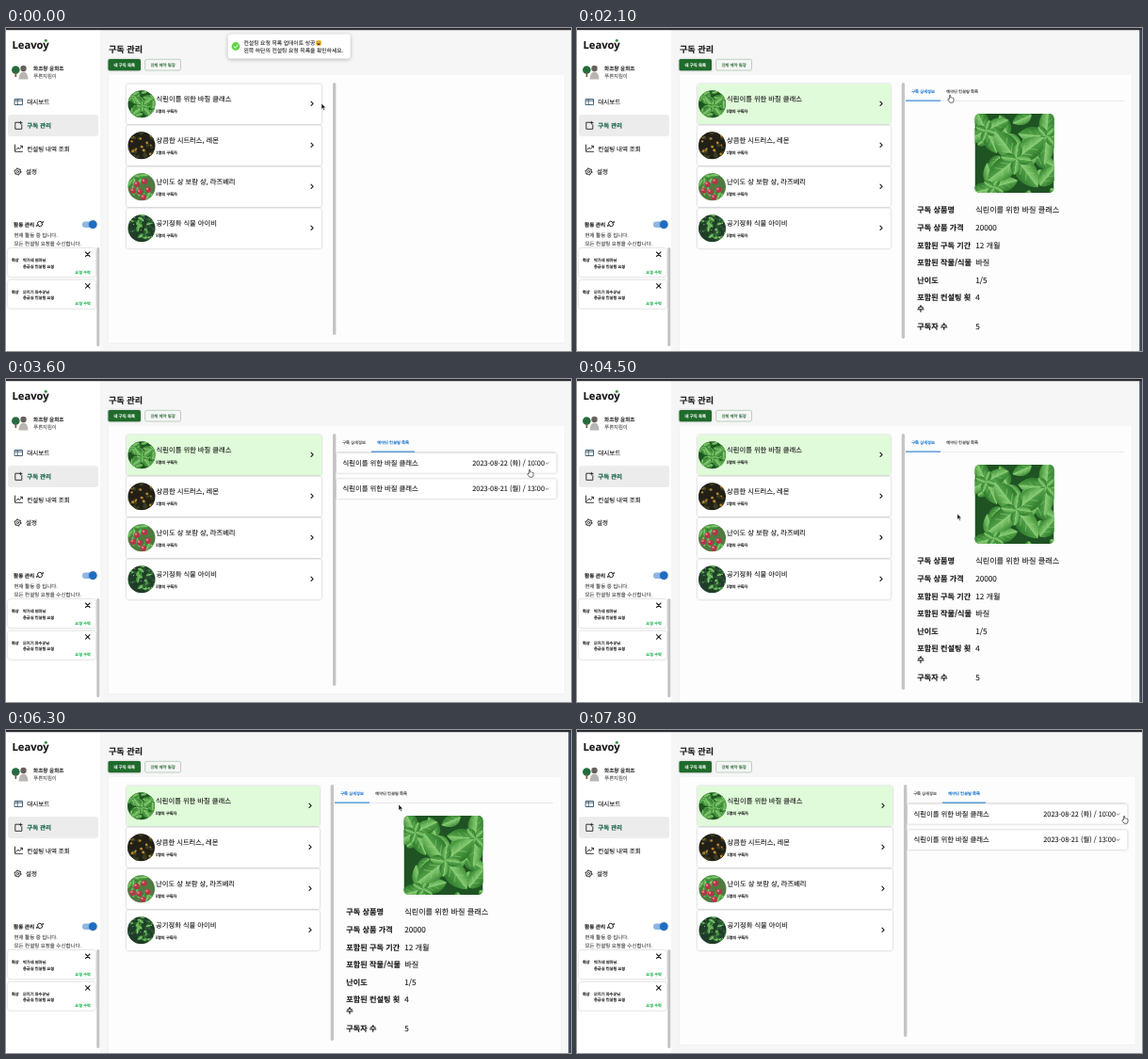
Recreate the animation shown at these times as an HTML page. Size 600x343 px, loop 8 s.

```html
<!DOCTYPE html>
<html lang="ko">
<head>
<meta charset="utf-8">
<title>구독 관리</title>
<style>
@property --narrow { syntax: "<number>"; inherits: true; initial-value: 0; }
@property --sel { syntax: "<number>"; inherits: true; initial-value: 0; }
@property --booked { syntax: "<number>"; inherits: true; initial-value: 0; }

html, body { margin: 0; width: 100%; height: 100%; overflow: hidden; background: #f6f6f6; }
svg { display: block; }
#app {
  width: 600px; height: 343px; color: #1a1a1a;
  font-family: "Noto Sans CJK KR", "Noto Sans CJK", "Noto Sans", sans-serif;
  animation: state 8s step-end infinite;
}
/* A hairline keeps the small type as dark as a scaled-down screen. */
text { fill: currentColor; stroke: currentColor; stroke-width: .1px; text-rendering: geometricPrecision; }
.b { font-weight: 700; }
.m { font-weight: 500; stroke-width: .16px; }
.mid { text-anchor: middle; }
.line { fill: none; stroke: #222; stroke-linecap: round; stroke-linejoin: round; }
.lift { filter: drop-shadow(0 .6px .8px #0004); }

/* Layout follows the page width; --narrow is 1 while the right edge is taken. */
#panel {
  width: calc(485px - 4px * var(--narrow)); height: calc(284.5px + 20px * var(--narrow));
  filter: drop-shadow(0 .3px .5px #0002);
}
.card { width: calc(207px - 2px * var(--narrow)); }
.nudge { transform: translateX(calc(-.5px * var(--narrow))); }
.shift { transform: translateX(calc(-2px * var(--narrow))); }
#divider { transform: translateX(calc(-2.3px * var(--narrow))); height: calc(268px + 4px * var(--narrow)); }
#toastBox { transform: translateX(calc(-2.3px * var(--narrow))); }
.picked { fill: #e0fbd9; opacity: var(--sel); }
#tabs { opacity: var(--sel); }
#detail, #edge { opacity: var(--narrow); }
#booked { opacity: var(--booked); }
#tab1 { color: color-mix(in srgb, #1976d2 calc(var(--narrow) * 100%), #555); }
#tab2 { color: color-mix(in srgb, #1976d2 calc(var(--booked) * 100%), #555); }

@keyframes state {
  0% { --narrow: 0; --sel: 0; --booked: 0; }
  6.25% { --narrow: 1; --sel: 1; --booked: 0; }
  28.75% { --narrow: 0; --sel: 1; --booked: 1; }
  52.5% { --narrow: 1; --sel: 1; --booked: 0; }
  83.75%, 100% { --narrow: 0; --sel: 1; --booked: 1; }
}

#bar { animation: bar 8s cubic-bezier(.4, 0, .2, 1) infinite; }
@keyframes bar {
  0%, 28.75% { x: 351px; width: 37px; }
  31.25%, 52.5% { x: 388px; width: 46px; }
  55%, 83.75% { x: 351px; width: 37px; }
  86.25%, 100% { x: 388px; width: 46px; }
}

#toast { transform-origin: 301px 19.5px; animation: toast 8s linear infinite; }
@keyframes toast {
  0% { transform: none; opacity: 1; }
  14.85% { transform: none; opacity: 1; animation-timing-function: cubic-bezier(.06, .71, .55, 1); }
  18.85% { transform: translateY(-39px) scale(.6); opacity: 0; }
  57.99% { transform: translateY(-52px) scale(.6); opacity: 0; }
  58% { transform: translateY(-52px) scale(.6); opacity: .5; animation-timing-function: cubic-bezier(.21, 1.02, .73, 1); }
  62% { transform: none; opacity: 1; }
  73% { transform: none; opacity: 1; animation-timing-function: cubic-bezier(.06, .71, .55, 1); }
  77%, 100% { transform: translateY(-39px) scale(.6); opacity: 0; }
}

#cursor { animation: move 8s linear infinite; }
@keyframes move {
  0%, 1.25% { transform: translate(335px, 80px); }
  5%, 15% { transform: translate(324px, 80px); }
  18% { transform: translate(340px, 78px); }
  25% { transform: translate(394px, 71px); }
  26.25%, 30% { transform: translate(396px, 71px); }
  40% { transform: translate(540px, 92px); }
  45%, 46.25% { transform: translate(556px, 96px); }
  51%, 53.5% { transform: translate(370px, 68px); }
  58% { transform: translate(425px, 190px); }
  60.5% { transform: translate(436px, 308px); }
  63.75% { transform: translate(445px, 210px); }
  67.5% { transform: translate(445px, 200px); }
  74% { transform: translate(425px, 110px); }
  78.75% { transform: translate(417px, 79px); }
  81.5%, 84.5% { transform: translate(405px, 69px); }
  91% { transform: translate(555px, 88px); }
  94% { transform: translate(576px, 130px); }
  97.5%, 100% { transform: translate(581px, 91px); }
}
#arrow { animation: arrow 8s step-end infinite; }
#hand { animation: hand 8s step-end infinite; }
#beam { animation: beam 8s step-end infinite; }
@keyframes arrow {
  0%, 16.25%, 55%, 67.5%, 93.75% { opacity: 1; }
  2.5%, 23.75%, 57.5%, 81.25%, 96.25%, 100% { opacity: 0; }
}
@keyframes hand {
  0%, 16.25%, 55%, 93.75% { opacity: 0; }
  2.5%, 23.75%, 81.25%, 96.25%, 100% { opacity: 1; }
}
@keyframes beam {
  0%, 67.5%, 100% { opacity: 0; }
  57.5% { opacity: 1; }
}
</style>
</head>
<body>
<svg id="app" viewBox="0 0 600 343">
  <defs>
    <clipPath id="round"><circle r="14.5"/></clipPath>
    <clipPath id="photoBox"><rect x="-42" y="-42" width="84" height="84" rx="5"/></clipPath>
    <linearGradient id="leafTone" x1="0" y1="0" x2="1" y2="0">
      <stop offset="0" stop-color="#3f8f37"/><stop offset=".48" stop-color="#86cc72"/>
      <stop offset=".52" stop-color="#4f9f45"/><stop offset="1" stop-color="#2f7a2d"/>
    </linearGradient>
    <g id="leaf">
      <path d="M0 0C-14-7-16-24 0-38C16-24 14-7 0 0Z" fill="url(#leafTone)"/>
      <path d="M0-2V-34M0-9L-7-16M0-9L7-16M0-18L-6-24M0-18L6-24" fill="none" stroke="#9bd286" stroke-width=".5"/>
    </g>
    <g id="basil"></g>
    <g id="lemon"></g>
    <g id="berry"></g>
    <g id="ivy"></g>
    <path id="refresh" class="line" stroke-width="1" d="M-2.7-.4A2.7 2.7 0 0 1 2.4-1.2M2.7.4A2.7 2.7 0 0 1-2.4 1.2M1.3-1H3.2V-2.7M-1.3 1H-3.2V2.7"/>
  </defs>

  <rect width="600" height="343" fill="#f6f6f6"/>

  <!-- Sidebar -->
  <g>
    <rect width="100" height="343" fill="#fff"/>
    <text class="b" x="6.5" y="22" font-size="11.2" font-family="Noto Sans, sans-serif">Leavoy</text>
    <circle cx="42.3" cy="13.3" r="1.5" fill="#3c8b43"/>
    <circle cx="10.3" cy="44.5" r="4.3" fill="#246b3c"/>
    <rect x="9.5" y="47" width="1.7" height="5" fill="#7a5a42"/>
    <circle cx="18.5" cy="43" r="3.2" fill="#66605c"/>
    <path d="M13.5 54.5Q14 46.5 18.5 46.5T23.5 54.5Z" fill="#b9b5b2"/>
    <text class="m" x="29" y="45.2" font-size="5.6">화초왕 윤화초</text>
    <text x="29.3" y="53" font-size="5.3" color="#555">푸른지킴이</text>

    <rect x="2" y="92" width="96" height="23" rx="3" fill="#ececec"/>
    <g font-size="6.5" class="m">
      <text x="22.3" y="80.7">대시보드</text>
      <text x="22.3" y="105.7" class="b" color="#0f5f42">구독 관리</text>
      <text x="22.3" y="130.5">컨설팅 내역 조회</text>
      <text x="21" y="155">설정</text>
    </g>
    <g class="line" stroke-width=".9">
      <path d="M9.5 75.5H17.5V81.5H9.5ZM12.2 75.5V81.5M9.5 77.2H17.5" stroke="#34566a"/>
      <path d="M14.5 100.2H9.8V107.3H16.8V102.7M15.7 99.2V102M14.3 100.6H17.1"/>
      <path d="M9.5 124V131.3H17.5M10.8 129.3L13 127L14.6 128.4L17.3 125.3M15.4 125.2H17.4V127.2"/>
      <circle cx="12.5" cy="152.5" r="3"/>
      <circle cx="12.5" cy="152.5" r="3.6" stroke-dasharray="1.5 2.27" stroke-linecap="butt"/>
      <circle cx="12.5" cy="152.5" r="1.1"/>
    </g>

    <text class="b" x="8" y="210.5" font-size="5.6">활동 관리</text>
    <use href="#refresh" x="36" y="208"/>
    <rect x="81" y="205.5" width="15" height="6.4" rx="3.2" fill="#8db8e6"/>
    <circle class="lift" cx="92.3" cy="208.6" r="4.3" fill="#1d6dc3"/>
    <g font-size="5.47" color="#484848">
      <text x="8.5" y="222">현재 활동 중 입니다.</text>
      <text x="8.5" y="230.7">모든 컨설팅 요청을 수신합니다.</text>
    </g>
    <g id="calls"></g>
    <rect x="96.3" y="233" width="3" height="105" rx="1.5" fill="#c3c3c3"/>
  </g>

  <!-- Main page -->
  <text class="b" x="109" y="25.6" font-size="9.1">구독 관리</text>
  <rect class="lift" x="108.5" y="33" width="34.5" height="12.3" rx="1.6" fill="#1f6b2c"/>
  <text class="b mid" x="125.8" y="40.8" font-size="4.35" color="#fff">내 구독 목록</text>
  <rect x="147.7" y="33.3" width="37.8" height="11.7" rx="1.6" fill="none" stroke="#93b898" stroke-width=".6"/>
  <text class="m mid" x="166.6" y="40.8" font-size="4.35" color="#3d7546">전체 예약 일정</text>
  <rect id="panel" x="108.5" y="50" fill="#fdfdfd"/>
  <g id="cards"></g>
  <rect id="divider" x="347" y="58" width="3.4" rx="1.7" fill="#c5c5c5"/>

  <g id="tabs"><g class="shift">
    <rect x="351" y="77.3" width="232" height=".6" fill="#ddd"/>
    <g class="mid" font-size="4.25">
      <text id="tab1" class="m" x="369.5" y="69.4">구독 상세정보</text>
      <text id="tab2" class="m" x="411" y="69.4">예약된 컨설팅 목록</text>
    </g>
    <rect id="bar" y="76.6" height="1" fill="#1976d2"/>
  </g></g>

  <g id="detail">
    <g transform="translate(464.5 133)" clip-path="url(#photoBox)"><use href="#basil"/></g>
    <g id="facts" font-size="8.15"></g>
  </g>
  <g id="booked" font-size="7.34"></g>

  <g id="toastBox"><g id="toast">
    <rect x="235.7" y="6.5" width="130" height="26" rx="3" fill="#fff" style="filter:drop-shadow(0 1px 2px #0004)"/>
    <circle cx="244" cy="19.5" r="4.4" fill="#61d345"/>
    <path class="line" d="M242 19.7L243.5 21.2L246.2 17.9" style="stroke:#fff" stroke-width="1"/>
    <g font-size="5.8" color="#2c2c2c">
      <text x="252.5" y="18">컨설팅 요청 목록 업데이트 성공</text>
      <text x="252.5" y="25.5">왼쪽 하단의 컨설팅 요청 목록을 확인하세요.</text>
    </g>
    <circle cx="332" cy="15.9" r="3.1" fill="#f8c63d"/>
    <path d="M330 16.3H334Q333.6 18.3 332 18.3T330 16.3Z" fill="#7a3b1c"/>
    <path class="line" d="M330.3 14.9L331 14.4L331.5 14.9M332.6 14.9L333.2 14.4L333.8 14.9" stroke-width=".4"/>
  </g></g>

  <rect id="edge" x="597.3" width="2.7" height="343" fill="#3b4659"/>
  <rect width="600" height="2.2" fill="#2c2c32"/>

  <g id="cursor" stroke="#fff" stroke-width=".5" stroke-linejoin="round">
    <path id="arrow" fill="#111" d="M0 0V6.4L1.4 5.1L2.4 7.4L3.5 6.9L2.5 4.7H4.5Z"/>
    <path id="hand" fill="#fff" style="stroke:#111" stroke-width=".6" d="M-.6 4.6V.6Q0-.3 .7.6V3Q1.3 2.4 1.8 3.1Q2.5 2.6 2.9 3.4Q3.6 3 4 4V6Q3.8 7.2 3.2 8.2H0L-2.2 5.1Q-2.2 4-1.3 4.2Z"/>
    <path id="beam" fill="none" style="stroke:#333" stroke-width=".7" d="M-1.5-4Q0-4 0-3Q0-4 1.5-4M0-3V3M-1.5 4Q0 4 0 3Q0 4 1.5 4"/>
  </g>
</svg>

<script>
const fill = (id, html) => { document.getElementById(id).innerHTML = html; };
const text = (x, y, s, attrs = "") => `<text x="${x}" y="${y}" ${attrs}>${s}</text>`;
const dot = (x, y, r, color) => `<circle cx="${x}" cy="${y}" r="${r}" fill="${color}"/>`;
const many = (n, make) => Array.from({ length: n }, (_, i) => make(i)).join("");

let seed = 7;
const rand = () => (seed = seed * 16807 % 2147483647) / 2147483647;
const spread = r => (rand() * 2 - 1) * r;

// Plant pictures, drawn around their own centre
const leaf = (x, y, turn, size) =>
  `<use href="#leaf" transform="translate(${x} ${y}) rotate(${turn}) scale(${size})"/>`;
const sprig = (x, y, turn, size) =>
  [45, 135, 225, 315].map(a => leaf(x, y, a + turn, size)).join("") +
  [0, 90, 180, 270].map(a => leaf(x, y, a + turn, size * .45)).join("");
const ground = (r, color) => `<rect x="${-r}" y="${-r}" width="${2 * r}" height="${2 * r}" fill="${color}"/>`;

fill("basil", ground(42, "#1f5323") +
  many(24, () => leaf(spread(46), spread(46), rand() * 360, .4 + rand() * .4)) +
  sprig(-30, -24, 20, .7) + sprig(34, -18, 50, .8) + sprig(-22, 36, 30, .7) + sprig(2, 6, 8, 1));
fill("lemon", ground(15, "#211f16") +
  many(26, () => dot(spread(14), spread(14), 1 + rand() * 1.6, "#3a3c20")) +
  many(14, () => dot(spread(11), spread(11), .7 + rand() * .9, "#b9862c")));
fill("berry", ground(15, "#4f7a40") +
  many(16, () => leaf(spread(14), spread(14), rand() * 360, .28)) +
  [[-5, -3], [3, -6], [7, 3], [-2, 5], [2, 11], [-9, 4]].map(([x, y]) =>
    dot(x, y, 3.1, "#b5364a") + dot(x - 1, y - 1, 1.2, "#e0808a")).join(""));
fill("ivy", ground(15, "#1f3d28") +
  many(18, () => leaf(spread(14), spread(14), rand() * 360, .12 + rand() * .1)) +
  many(22, () => dot(spread(14), spread(14), 1.5, "#2c5535")) +
  many(10, () => dot(spread(12), spread(12), .6, "#9dbb9a")));

const plans = [
  ["basil", "식린이를 위한 바질 클래스", 5],
  ["lemon", "상큼한 시트러스, 레몬", 1],
  ["berry", "난이도 상 보람 상, 라즈베리", 5],
  ["ivy", "공기정화 식물 아이비", 5],
];
fill("cards", plans.map(([plant, name, count], i) => {
  const box = c => `<rect class="card ${c}" x="128" width="207" height="42.3" rx="2"`;
  return `<g transform="translate(0 ${59.6 + 44 * i})">
    ${box("lift")} fill="#fff"/>
    ${i ? "" : box("picked") + "/>"}
    <g class="nudge">
      <g transform="translate(144 21.2)" clip-path="url(#round)">
        <use href="#${plant}" ${i ? "" : 'transform="scale(.36)"'}/>
      </g>
      ${text(159.5, 18.9, name, 'font-size="7.3"')}
      ${text(159.2, 30.3, count + "명의 구독자", 'class="m" font-size="4.2"')}
    </g>
    <path class="line shift" d="M324 18.6L326.1 20.7L324 22.8" stroke-width="1.2"/>
  </g>`;
}).join(""));

fill("calls", ["박가네 엄마님", "문지기 파수꾼님"].map((who, i) =>
  `<g transform="translate(0 ${33.7 * i})" font-size="4.2">
    <rect class="lift" x="2" y="234" width="93" height="30" rx="3" fill="#fff"/>
    ${text(6, 248, "화상", 'class="b"')}
    ${text(18, 248, who, 'class="m"')}
    ${text(18, 254.7, "응급실 컨설팅 요청", 'class="m"')}
    ${text(73.3, 260.7, "요청 수락", 'class="m" color="#27b457"')}
    <path class="line" d="M84.5 238L89 242.5M89 238L84.5 242.5" stroke-width="1.1"/>
  </g>`).join(""));

const facts = [
  [196.4, "구독 상품명", plans[0][1]],
  [215, "구독 상품 가격", "20000"],
  [233.5, "포함된 구독 기간", "12 개월"],
  [252, "포함된 작물/식물", "바질"],
  [270.6, "난이도", "1/5"],
  [289, "포함된 컨설팅 횟", "4"],
  [301, "수", ""],
  [320, "구독자 수", "5"],
];
fill("facts", facts.map(([y, label, value]) =>
  text(361.3, y, label, 'class="b"') + text(423.2, y, value)).join(""));

fill("booked", ["2023-08-22 (화) / 10:00", "2023-08-21 (월) / 13:00"].map((when, i) =>
  `<g transform="translate(0 ${27.2 * i})">
    <rect class="lift" x="351" y="79" width="233.5" height="20.7" rx="1.5" fill="#fff"/>
    ${text(357.5, 92.1, plans[0][1])}
    ${text(495.3, 92.1, when)}
    <path class="line" d="M573.1 88.8L574.5 90.2L575.9 88.8" stroke-width=".6"/>
  </g>`).join(""));
</script>
</body>
</html>
```
